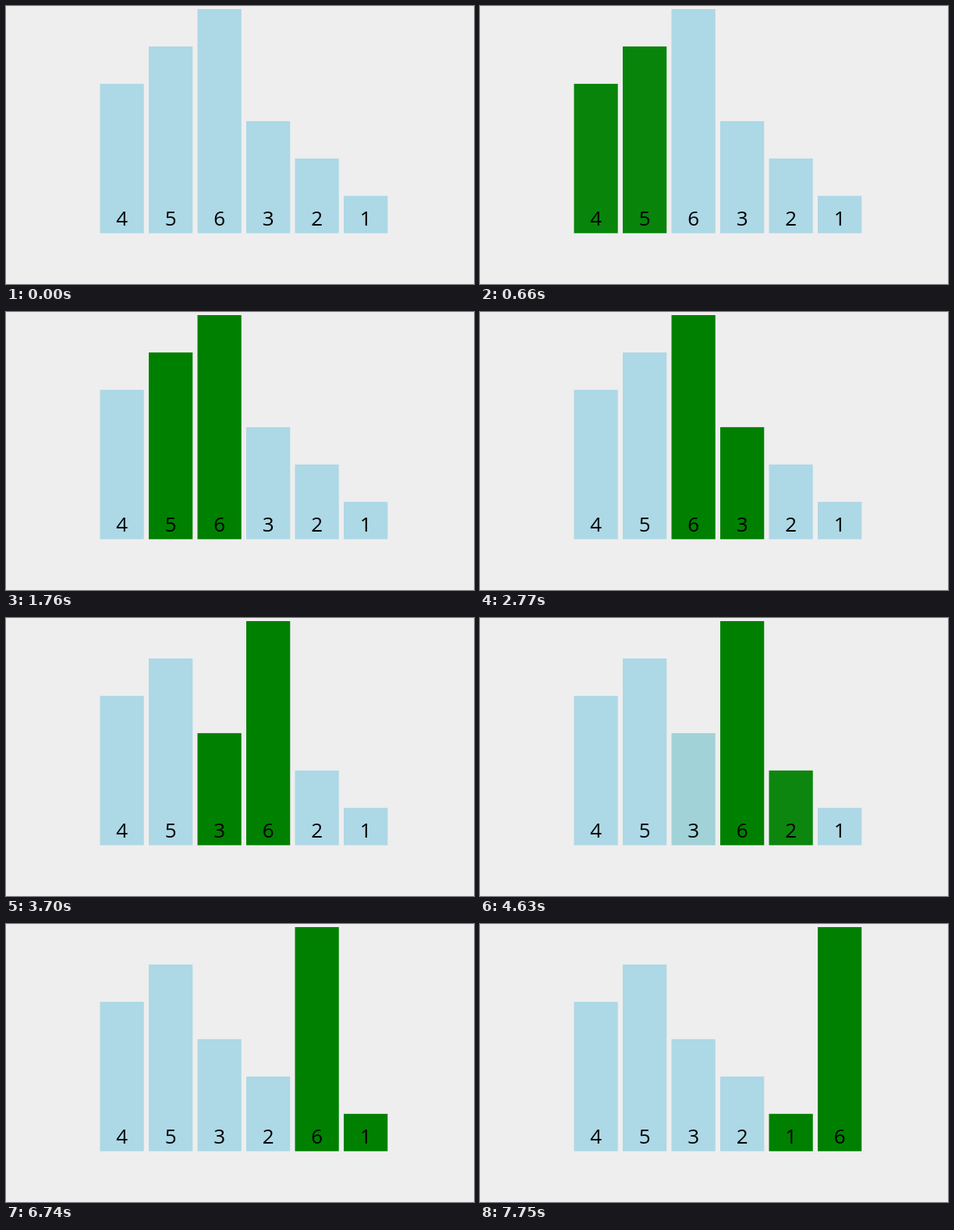
An HTML page with a canvas that plays this animation: 600x357 px, repeating every 8000 ms.

```html
<!DOCTYPE html>
<html>
<head>
<meta charset="utf-8">
<style>
  html, body { margin: 0; height: 100%; overflow: hidden; background: #eee; }
  canvas { display: block; }
</style>
</head>
<body>
<canvas id="stage" width="600" height="357"></canvas>
<script>
const ctx = document.getElementById('stage').getContext('2d');
const LOOP = 8000, TICK = 84.5, STEP = 80, DURATION = 240;
const PITCH = 62.5, WIDTH = 56.25, UNIT = 47.96, LEFT = 120.5, BASE = 291.75;
const LIGHT_BLUE = [173, 216, 230], GREEN = [0, 128, 0];
const values = [4, 5, 6, 3, 2, 1];

// One bubble sort pass: each state holds the order and the highlighted pair
function sortStates() {
  const order = [...values];
  const states = [{ order: [...order], pair: [] }];
  for (let i = 0; i < order.length - 1; i++) {
    const pair = [order[i], order[i + 1]];
    states.push({ order: [...order], pair });
    if (pair[0] > pair[1]) {
      [order[i], order[i + 1]] = [pair[1], pair[0]];
      states.push({ order: [...order], pair });
    }
  }
  return states;
}
const states = sortStates();

const mix = (a, b, p) => a + (b - a) * p;
const cubicInOut = p => p < 0.5 ? 4 * p ** 3 : 1 - 4 * (1 - p) ** 3;

// Transitions start at an even pace, first show on the next tick and advance in steps
function progress(n, time) {
  const start = 482 + 994.5 * n;
  const first = TICK * Math.ceil(start / TICK);
  const step = Math.floor((time - first + 10) / STEP);
  return step < 0 ? 0 : cubicInOut(Math.min(1, (first - start + step * STEP) / DURATION));
}

function draw(time) {
  let n = 0;
  while (n < states.length - 2 && progress(n + 1, time) > 0) n++;
  const from = states[n], to = states[n + 1], p = progress(n, time);

  ctx.fillStyle = '#eee';
  ctx.fillRect(0, 0, 600, 357);
  ctx.font = '26px "Open Sans", "Noto Sans", sans-serif';
  ctx.textAlign = 'center';
  for (const value of values) {
    const x = LEFT + PITCH * mix(from.order.indexOf(value), to.order.indexOf(value), p);
    const green = mix(+from.pair.includes(value), +to.pair.includes(value), p);
    const rgb = LIGHT_BLUE.map((c, i) => Math.round(mix(c, GREEN[i], green)));
    ctx.fillStyle = `rgb(${rgb})`;
    ctx.fillRect(x, BASE - value * UNIT, WIDTH, value * UNIT);
    ctx.fillStyle = '#000';
    ctx.fillText(value, x + WIDTH / 2, 282);
  }
}

const origin = performance.now();
function tick() {
  draw((performance.now() - origin) % LOOP);
  requestAnimationFrame(tick);
}
tick();
</script>
</body>
</html>
```
